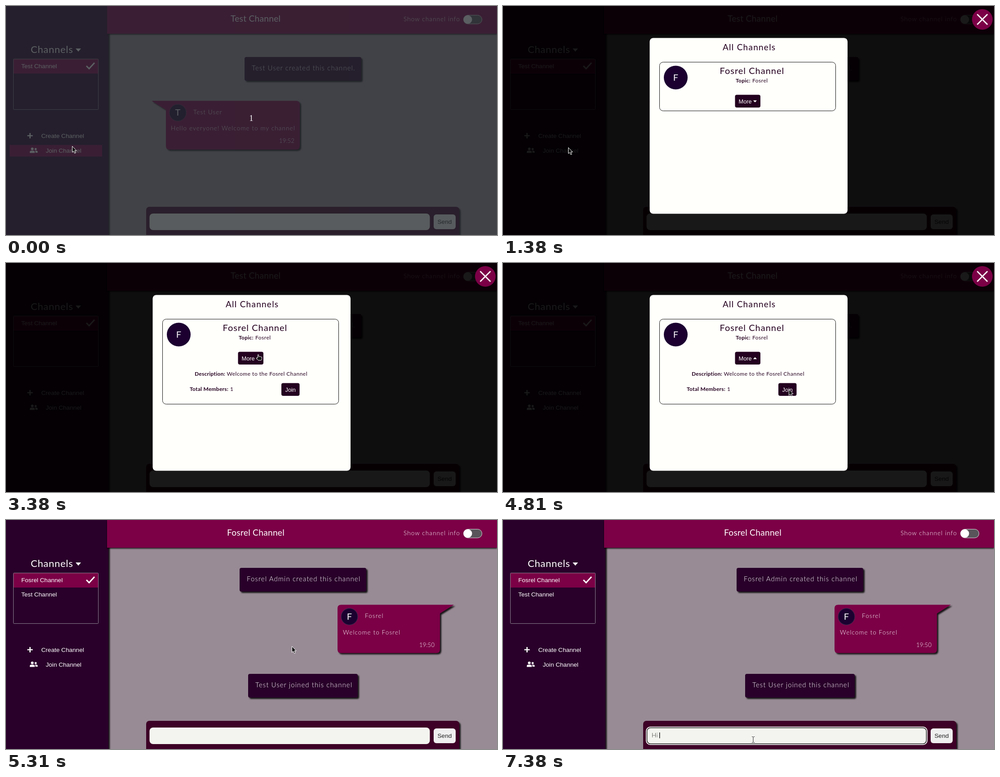
An HTML page that plays this animation: 1093 px wide and 512 px high, repeating every 8000 ms.

```html
<!DOCTYPE html>
<html lang="en">
<head>
<meta charset="utf-8">
<title>Channel chat</title>
<style>
html, body { margin: 0; width: 100%; height: 100%; overflow: hidden; background: #988b95; }
svg { display: block; width: 1093px; height: 512px; }
text { font-family: Lato, sans-serif; fill: #fff; white-space: pre; }
.ui { font: 13.6px "Liberation Sans", Arial, sans-serif; }
.btn { font: 12.8px "Liberation Sans", Arial, sans-serif; }
.title { font-size: 19.2px; letter-spacing: .25px; }
.note { font-size: 15px; font-weight: 300; letter-spacing: 1.08px; }
.msg { font-size: 13.6px; font-weight: 300; letter-spacing: 1.08px; }
.time { font-size: 12.8px; font-weight: 300; letter-spacing: .3px; }
.small { font-size: 12px; letter-spacing: .5px; fill: #25001f; }
.label { font-size: 12px; font-weight: 700; letter-spacing: .25px; fill: #25001f; }
.big { fill: #25001f; font-size: 20px; letter-spacing: 1px; }
.ink { fill: #222; }
.plum { fill: #29002a; }
.wine { fill: #7b0046; }
.dark { fill: #23001f; }
.avatar { fill: #1b0030; stroke: #3b3350; }
.shadow { filter: drop-shadow(3px 3px 1.5px rgba(0,0,0,.85)); }
.white { fill: #fff; }
.line { fill: none; stroke: #fff; }

/* Every state shares one 8 s clock; 1% = 80 ms. */
.count, .hover, .modal, .closed, .open, .roomA, .roomB, .listA, .listB, .feed,
.focus, .caret, .key1, .key2, .pointer, .arrow, .hand, .beam {
  animation: 8s step-end infinite;
}
.count { animation-name: count; }
.hover { animation-name: hover; }
.modal { animation-name: modal; }
.closed { animation-name: closed; }
.open { animation-name: open; }
.roomA { animation-name: roomA; }
.roomB { animation-name: roomB; }
.listA { animation-name: listA; }
.listB { animation-name: listB; }
.feed { animation-name: feed; }
.focus { animation-name: focus; }
.caret { animation-name: caret; }
.key1 { animation-name: key1; }
.key2 { animation-name: key2; }
.pointer { animation-name: pointer; }
.arrow { animation-name: arrow; }
.hand { animation-name: hand; }
.beam { animation-name: beam; }

@keyframes count { 0% { opacity: 1 } .75%, 100% { opacity: 0 } }
@keyframes hover { 0% { opacity: 1 } 17.25%, 100% { opacity: 0 } }
@keyframes modal { 0% { opacity: 0 } 17.25% { opacity: 1 } 61%, 100% { opacity: 0 } }
@keyframes closed { 0% { opacity: 1 } 42.25%, 100% { opacity: 0 } }
@keyframes open { 0% { opacity: 0 } 42.25%, 100% { opacity: 1 } }
@keyframes roomA { 0% { opacity: 1 } 61.75%, 100% { opacity: 0 } }
@keyframes roomB { 0% { opacity: 0 } 61.75%, 100% { opacity: 1 } }
@keyframes listA { 0% { opacity: 1 } 64.125%, 100% { opacity: 0 } }
@keyframes listB { 0% { opacity: 0 } 64.125%, 100% { opacity: 1 } }
@keyframes feed {
  0% { opacity: 0 } 64.125% { opacity: .4 } 64.875% { opacity: .65 }
  65.625% { opacity: .85 } 66.375%, 100% { opacity: 1 }
}
@keyframes focus { 0% { opacity: 0 } 79.75%, 100% { opacity: 1 } }
@keyframes key1 { 0% { opacity: 0 } 88.25%, 100% { opacity: 1 } }
@keyframes key2 { 0% { opacity: 0 } 89.875%, 100% { opacity: 1 } }
@keyframes caret {
  0% { opacity: 0; transform: none }
  79.75% { opacity: 1; transform: none }
  86.75% { opacity: 0; transform: none }
  88.25% { opacity: 1; transform: translateX(9px) }
  89.875% { opacity: 1; transform: translateX(12px) }
  92.25%, 100% { opacity: 1; transform: translateX(16px) }
}
@keyframes arrow {
  0% { opacity: 1 } 3.125% { opacity: 0 } 17.25% { opacity: 1 } 33.625% { opacity: 0 }
  47.625% { opacity: 1 } 52.375% { opacity: 0 } 60.125% { opacity: 1 } 78.125%, 100% { opacity: 0 }
}
@keyframes hand {
  0% { opacity: 0 } 3.125% { opacity: 1 } 17.25% { opacity: 0 } 33.625% { opacity: 1 }
  47.625% { opacity: 0 } 52.375% { opacity: 1 } 60.125%, 100% { opacity: 0 }
}
@keyframes beam { 0% { opacity: 0 } 78.125%, 100% { opacity: 1 } }
@keyframes pointer {
  0% { transform: translate(147px, 313px) }
  3.125% { transform: translate(147px, 314px) }
  3.875% { transform: translate(147px, 316px) }
  17.25% { transform: translate(145px, 316px) }
  23.5% { transform: translate(160px, 311px) }
  24.875% { transform: translate(222px, 296px) }
  26.25% { transform: translate(315px, 275px) }
  27.5% { transform: translate(405px, 254px) }
  28.875% { transform: translate(475px, 238px) }
  30.25% { transform: translate(528px, 226px) }
  31.5% { transform: translate(560px, 219px) }
  32.875% { transform: translate(552px, 218px) }
  33.625% { transform: translate(559px, 211px) }
  36.75% { transform: translate(562px, 204px) }
  47.625% { transform: translate(575px, 214px) }
  48.75% { transform: translate(612px, 240px) }
  50% { transform: translate(634px, 258px) }
  52.375% { transform: translate(640px, 272px) }
  53.875% { transform: translate(638px, 279px) }
  54.75% { transform: translate(636px, 282px) }
  71.125% { transform: translate(612px, 360px) }
  72.625% { transform: translate(593px, 417px) }
  75% { transform: translate(570px, 450px) }
  75.75% { transform: translate(559px, 468px) }
  78.125% { transform: translate(557px, 485px) }
  79.75%, 100% { transform: translate(557px, 491px) }
}
</style>
</head>
<body>
<svg viewBox="0 0 1093 512">
  <defs>
    <path id="tick" class="line" stroke-width="3" d="M179 134l6 6 12-13"/>
    <path id="down" class="white" d="M0 0h8l-4 4.5z"/>
  </defs>
  <rect width="1093" height="512" fill="#988b95"/>

  <!-- Sidebar -->
  <rect class="plum shadow" y="-9" width="228" height="530"/>
  <text x="55" y="105" font-size="22" letter-spacing=".7">Channels</text>
  <path class="white" d="M155 95h12l-6 7z"/>
  <rect class="wine" x="17" y="119" width="188" height="32"/>
  <rect x="16.5" y="118.5" width="189" height="113" rx="1" fill="none" stroke="#8d8490"/>
  <use href="#tick"/>
  <text class="ui listA" x="34" y="139">Test Channel</text>
  <g class="listB">
    <text class="ui" x="34" y="139">Fosrel Channel</text>
    <text class="ui" x="34" y="171">Test Channel</text>
  </g>
  <path class="line" stroke-width="2.6" d="M47.5 290h12M53.5 284v12"/>
  <text class="ui" x="78.5" y="295">Create Channel</text>
  <rect class="wine hover" x="8" y="310.5" width="206" height="26"/>
  <g class="white">
    <circle cx="58.5" cy="319.5" r="3"/>
    <path d="M53 328.5v-2q0-3 3-3h5q3 0 3 3v2z"/>
    <circle cx="66" cy="320" r="2.4"/>
    <path d="M65.5 328v-2q0-1.5-1-2.5h3q3 0 3 2.5v2z"/>
  </g>
  <text class="ui" x="88.5" y="328">Join Channel</text>

  <!-- Header -->
  <rect class="wine" x="225" width="868" height="62" style="filter:drop-shadow(0 2px 1.5px rgba(0,0,0,.8))"/>
  <text class="title roomA" x="500" y="35">Test Channel</text>
  <text class="title roomB" x="492" y="35">Fosrel Channel</text>
  <text class="msg" x="885" y="34">Show channel info</text>
  <rect x="1018.5" y="20.5" width="41" height="19.5" rx="9.75" fill="#58545a" stroke="#ddd"/>
  <circle class="white" cx="1028" cy="30.3" r="9.5"/>

  <!-- First room -->
  <g class="roomA">
    <rect class="plum shadow" x="531" y="114" width="260" height="53" rx="4"/>
    <text class="note" x="547" y="144">Test User created this channel.</text>
    <path class="wine shadow" d="M324 212H646q8 0 8 8v93q0 8-8 8H364q-8 0-8-8V232z"/>
    <circle class="avatar" cx="382.5" cy="238.5" r="18.5"/>
    <text x="382.5" y="245" font-size="20" text-anchor="middle">T</text>
    <text class="msg" x="417" y="242">Test User</text>
    <text class="msg" x="367" y="278">Hello everyone! Welcome to my channel</text>
    <text class="time" x="608" y="306">19:52</text>
  </g>

  <!-- Second room -->
  <g class="feed">
    <rect class="plum shadow" x="520" y="107" width="282" height="53" rx="4"/>
    <text class="note" x="536" y="137">Fosrel Admin created this channel</text>
    <path class="wine shadow" d="M997 189.5H746q-8 0-8 8v92q0 8 8 8h212q8 0 8-8V209z"/>
    <circle class="avatar" cx="764.5" cy="216" r="18.5"/>
    <text x="764.5" y="222.5" font-size="20" text-anchor="middle">F</text>
    <text class="msg" x="799" y="219">Fosrel</text>
    <text class="msg" x="750" y="256">Welcome to Fosrel</text>
    <text class="time" x="920" y="284">19:50</text>
    <rect class="plum shadow" x="539" y="344" width="244" height="53" rx="4"/>
    <text class="note" x="555" y="374">Test User joined this channel</text>
  </g>

  <!-- Message bar -->
  <rect class="shadow" x="312" y="449" width="697" height="80" rx="7" fill="#3d0026"/>
  <rect x="319.5" y="464" width="624" height="37" rx="8" fill="#f3f4ef"/>
  <g class="focus" fill="none">
    <rect x="319" y="463" width="625" height="39" rx="9" stroke="#fff" stroke-width="2"/>
    <rect x="320.5" y="464.5" width="622" height="36" rx="8" stroke="#101010" stroke-width="1.5"/>
  </g>
  <rect x="952" y="466" width="49" height="33" rx="6" fill="#efefef"/>
  <text class="ui ink" x="960.5" y="487">Send</text>
  <text class="msg ink key1" x="331" y="486">H</text>
  <text class="msg ink key2" x="341.5" y="486">i</text>
  <rect class="caret" x="332" y="475" width="1.3" height="13"/>

  <!-- Channel picker -->
  <g class="modal">
    <rect width="1093" height="512" fill="#000" fill-opacity=".9"/>
    <rect x="326.5" y="71.5" width="440.5" height="393" rx="8" fill="#fffffc"/>
    <circle class="wine" cx="1067" cy="30" r="23"/>
    <path class="line" stroke-width="2.8" d="M1055.5 18.5l23 23M1078.5 18.5l-23 23"/>
    <text class="big" x="489" y="99" style="font-size:19px;letter-spacing:1.25px">All Channels</text>
    <g fill="none" stroke="#111">
      <rect class="closed" x="348.5" y="125.5" width="392" height="109" rx="8"/>
      <rect class="open" x="348.5" y="125.5" width="392" height="190" rx="8"/>
    </g>
    <circle cx="384.5" cy="160" r="26.5" fill="#1b0030"/>
    <text x="384.5" y="167" font-size="20" text-anchor="middle">F</text>
    <text class="big" x="482.5" y="152">Fosrel Channel</text>
    <text class="label" x="518" y="171">Topic:</text>
    <text class="small" x="555" y="171">Fosrel</text>
    <rect class="dark" x="516.5" y="198.5" width="56.5" height="28.5" rx="4"/>
    <text class="btn" x="524.5" y="217.5">More</text>
    <use class="closed" href="#down" x="557" y="211"/>
    <g class="open">
      <path class="white" d="M557 215h8l-4-4.5z"/>
      <text class="label" x="420" y="252">Description:</text>
      <text class="small" x="491.5" y="252">Welcome to the Fosrel Channel</text>
      <text class="label" x="409" y="286">Total Members:</text>
      <text class="small" x="499" y="286">1</text>
      <rect class="dark" x="613" y="268.5" width="40.5" height="28.5" rx="4"/>
      <text class="btn" x="621.5" y="287.5">Join</text>
    </g>
  </g>

  <!-- Countdown -->
  <g class="count">
    <rect width="1093" height="512" fill="#242a2e" fill-opacity=".75"/>
    <text x="546" y="257" text-anchor="middle" style="font:18px 'Liberation Serif',serif">1</text>
  </g>

  <!-- Pointer -->
  <g class="pointer" fill="#111" stroke="#fff" stroke-linejoin="round">
    <path class="arrow" d="M.5 .5V14l3-2.7 2.3 5 2.4-1-2.3-4.9H10z"/>
    <path class="hand" d="M-1.5 8V1.5q0-1 1-1t1 1V5q4.5 0 7 1.5v3q0 2.5-1.5 4H-.5L-4.5 9q-.5-1.5 1-1.5z"/>
    <g class="beam" fill="none">
      <path stroke-width="3" stroke-opacity=".8" d="M-3-6.5h2l1 1 1-1h2M0-5.5v11M-3 6.5h2l1-1 1 1h2"/>
      <path stroke="#111" d="M-3-6.5h2l1 1 1-1h2M0-5.5v11M-3 6.5h2l1-1 1 1h2"/>
    </g>
  </g>
</svg>
</body>
</html>
```
